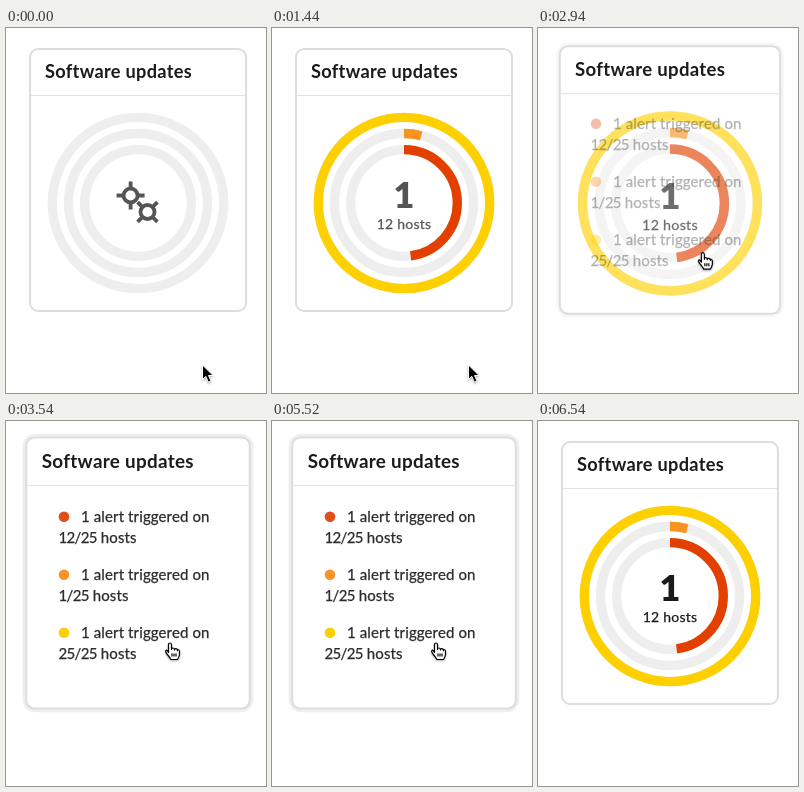
An HTML page for the animation above (7140 ms loop, 260 by 365 pixels).

```html
<!DOCTYPE html>
<html lang="en">
<head>
<meta charset="utf-8">
<title>Software updates</title>
<style>
  html, body { margin: 0; width: 100%; height: 100%; overflow: hidden; background: #fff; }
  svg { display: block; font-family: Lato, "Open Sans", sans-serif; fill: #1b1b1b; }
  .track, .arc { fill: none; stroke: #eee; stroke-width: 9.3; }
  .icon { fill: none; stroke: #555; stroke-width: 3.8; }
  #title { font-size: 18.2px; font-weight: 700; letter-spacing: .3px; }
  #list { font-size: 15px; letter-spacing: .12px; fill: #2b2b2b; stroke: #2b2b2b; stroke-width: .25; }
  #list circle { stroke: none; }
  #list tspan { letter-spacing: -.65px; }
  #stat { text-anchor: middle; }
  #hosts { font-size: 14px; letter-spacing: .25px; stroke: #1b1b1b; stroke-width: .25; }
  #cursor { stroke: #fff; stroke-linejoin: round; filter: drop-shadow(0 1px 1px #0005); }
</style>
</head>
<body>
<svg width="260" height="365" viewBox="0 0 260 365">
  <defs>
    <g id="target">
      <circle r="7"/>
      <path d="M0-14V-7M0 14V7M-14 0H-7M14 0H7"/>
    </g>
  </defs>
  <g id="card">
    <rect id="glow" x="24" y="21" width="216" height="262" rx="9" fill="none" stroke="#efefef" stroke-width="7"/>
    <rect x="24" y="21" width="216" height="262" rx="8" fill="#fff" stroke="#ddd" stroke-width="2"/>
    <path d="M25 67.5H239" stroke="#e2e2e2"/>
    <text id="title" x="39" y="50.3">Software updates</text>
    <g id="chart">
      <g id="rings"></g>
      <g id="icon" class="icon">
        <use href="#target" x="124.6" y="167.5"/>
        <use href="#target" transform="translate(141.5 184) rotate(45)"/>
      </g>
      <g id="stat">
        <text x="132" y="180" font-size="36" font-weight="900">1</text>
        <text id="hosts" x="132" y="201">12 hosts</text>
      </g>
    </g>
  </g>
  <g id="list"></g>
  <g id="cursor">
    <path id="arrow" fill="#000" d="M0 0V14.5L3.3 11.4 5.9 17.2 8.5 16 6 10.5H10.6Z"/>
    <path id="hand" fill="#fff" stroke="#000" stroke-width="1.2"
      d="M3 9V1.5Q3-.5 4.5-.5T6 1.5V6Q6 4.5 7.5 4.5T9 6.5Q9 5 10.5 5.2T12 7.2Q12 6 13 6.3T14 8V11Q13.5 14 12 16H5.5Q4 13.5 1.5 10.5-.5 8 .5 7T3 9ZM6.5 10V13M8.5 10V13M10.5 10V13"/>
  </g>
</svg>
<script>
const LOOP = 7140, STEP = 60;
const $ = id => document.getElementById(id);
const ramp = (t, a, b) => Math.min(1, Math.max(0, (t - a) / (b - a)));
const ease = (t, a, b) => { const x = ramp(t, a, b); return x * x * (3 - 2 * x); };
const mix = (a, b, k) => a + (b - a) * k;

const levels = [
  { color: '#e34000', dot: '#e04e1b', r: 53.3, hosts: 12 },
  { color: '#f7931e', dot: '#f7932a', r: 69.5, hosts: 1 },
  { color: '#ffd000', dot: '#fbd000', r: 85.7, hosts: 25 }
];

$('rings').innerHTML = levels.map(({ r, color }) => `
  <circle class="track" cx="132" cy="175" r="${r}"/>
  <circle class="arc" cx="132" cy="175" r="${r}" pathLength="360" style="stroke:${color}"/>`).join('');

$('list').innerHTML = levels.map(({ dot, hosts }, i) => `
  <g transform="translate(0 ${58 * i})">
    <circle cx="58" cy="95.7" r="5.3" fill="${dot}"/>
    <text x="75" y="100.5">1 alert triggered on</text>
    <text x="52.5" y="122"><tspan>${hosts}/25</tspan> hosts</text>
  </g>`).join('');

const arcs = document.querySelectorAll('.arc');

function drawArcs(p) {
  levels.forEach(({ hosts }, i) => {
    const full = hosts === 25;
    // The full ring opens in both directions from the top.
    const start = full ? -180 * p : 0;
    const length = full ? Math.min(360, 540 * p) : 360 * hosts / 25 * p;
    arcs[i].setAttribute('stroke-dasharray', length >= 360 ? 'none' : `${length} 360`);
    arcs[i].setAttribute('transform', `rotate(${start - 90} 132 175)`);
    arcs[i].style.visibility = length > 0 ? 'visible' : 'hidden';
  });
}

function drawCursor(t) {
  const enter = ease(t, 2340, 3000), leave = ease(t, 5940, 6480);
  const x = mix(mix(196.5, 159.5, enter), 190, leave);
  const y = mix(mix(337, 222.5, enter), 375, leave);
  const over = y < 284;
  $('cursor').setAttribute('transform', `translate(${x} ${y})`);
  $('arrow').style.display = over ? 'none' : '';
  $('hand').style.display = over ? '' : 'none';
}

function draw(t) {
  const grow = ease(t, 2640, 3180) - ease(t, 6120, 6480);
  const swap = ramp(t, 2700, 3360) - ramp(t, 6060, 6480);
  $('card').setAttribute('transform',
    `translate(132 152) scale(${1 + .035 * grow}) translate(-132 -152)`);
  $('glow').style.opacity = grow;
  $('chart').style.opacity = 1 - swap;
  $('list').style.opacity = swap;
  $('icon').style.display = t < 60 ? '' : 'none';
  $('stat').style.opacity = ramp(t, 570, 1740);
  drawArcs(ease(t, 240, 1200));
  drawCursor(t);
}

const begin = performance.now();
function tick() {
  const t = (performance.now() - begin) % LOOP;
  draw(Math.floor(t / STEP) * STEP);
  requestAnimationFrame(tick);
}
tick();
</script>
</body>
</html>
```
